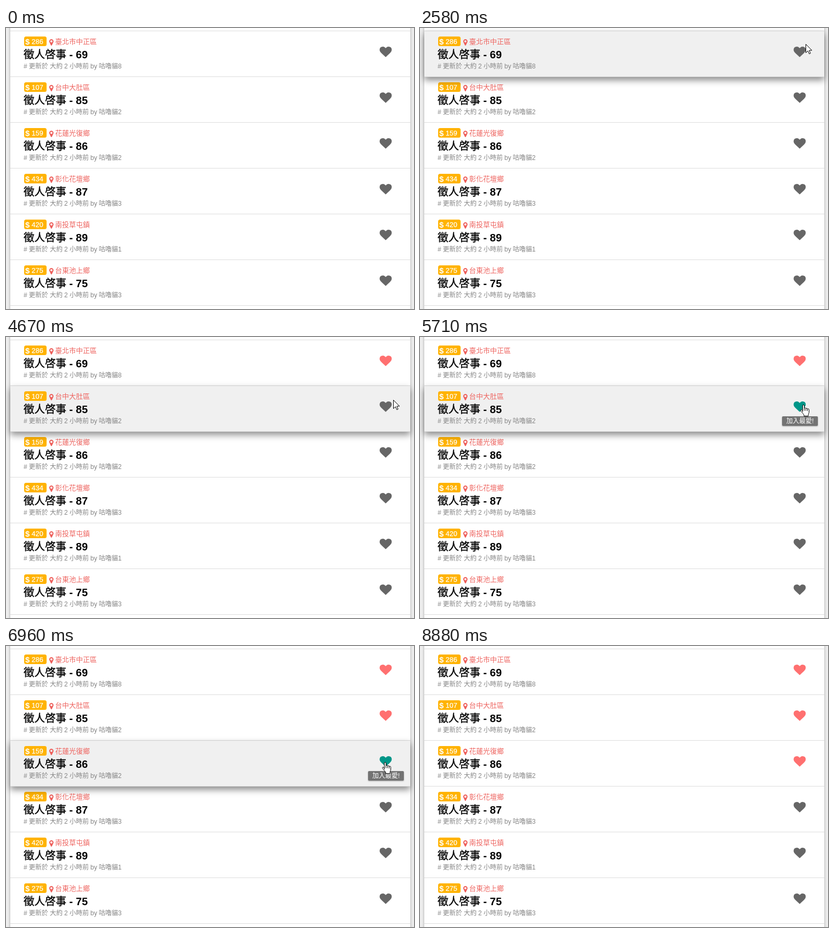
Recreate the animation shown at these times as an HTML page. Size 764 by 528 pixels, loop 8.93 s.

```html
<!DOCTYPE html>
<html lang="zh-Hant">
<head>
<meta charset="utf-8">
<title>Favourites list</title>
<style>
  html, body { margin: 0; width: 100%; height: 100%; overflow: hidden; }
  #stage {
    position: absolute; left: 0; top: 0; width: 764px; height: 528px; overflow: hidden;
    background: #eee;
    font-family: "Liberation Sans", "Noto Sans CJK TC", "Noto Sans CJK", sans-serif;
  }
  #page {
    position: absolute; left: 8px; top: -100px; width: 749px; height: 728px;
    background: #fff; box-shadow: 0 2px 5px rgba(0, 0, 0, .3);
  }
  .row {
    position: absolute; left: 8px; width: 749px; height: 86px;
    box-sizing: border-box; border-bottom: 1px solid #ddd;
  }
  .row svg { position: absolute; left: -8px; top: 0; width: 764px; height: 86px; overflow: visible; }
  text { white-space: pre; }
  .price { font-size: 13px; fill: #fff; stroke: #fff; stroke-width: .25px; }
  .sign { font-size: 15px; font-weight: bold; fill: #fff; }
  .place { font-size: 13px; font-weight: 300; fill: #ee6560; }
  .title { font-size: 20px; font-weight: bold; fill: #000; }
  .han { font-weight: 400; stroke: #000; stroke-width: .35px; }
  .meta { font-size: 12px; font-weight: 300; fill: #858585; word-spacing: -.2px; }
  .tip { filter: drop-shadow(0 1px 1px rgba(0, 0, 0, .3)); }
  .tip text { font-size: 12px; fill: #fff; }
  #cursor { position: absolute; left: 0; top: 0; width: 24px; height: 26px; overflow: visible; z-index: 9; }
  #cursor path { fill: #fff; stroke: #000; stroke-width: 1; stroke-linejoin: round; }
  #cursor .crease { fill: none; }
</style>
</head>
<body>
<div id="stage">
  <div id="page"></div>
  <svg id="cursor">
    <path id="arrow" d="M.5 .5V16.5L4.3 13 6.8 18.6 9.2 17.6 6.8 12H11.8Z"/>
    <g id="hand" transform="translate(-6 0)">
      <path d="M4.5 14V2a1.5 1.5 0 0 1 3 0V7.5a1.5 1.5 0 0 1 3 0V8.5a1.5 1.5 0 0 1 3 0v1a1.5 1.5 0 0 1 3 0V14c0 2-1.5 3.5-1.5 5.5v2H7v-2C6 17 2.5 14.5 1 11.5c-.6-1.5 1-2.5 2-1.5L4.5 12Z"/>
      <path class="crease" d="M7.5 7.5v4M10.5 8.5v3M13.5 9.5v2.5"/>
    </g>
  </svg>
</div>
<script>
const LOOP = 8930, FADE = 300, TOP = 6, ROW = 86;
const GRAY = [102, 102, 102], TEAL = [0, 150, 136], PINK = [255, 112, 112];

const HEART = "M896 1664q-26 0-44-18l-624-602q-10-8-27.5-26T145 952.5 77 855 23.5 734 0 596q0-220 127-344t351-124q62 0 126.5 21.5t120 58T820 276t76 68q36-36 76-68t95.5-68.5 120-58T1314 128q224 0 351 124t127 344q0 221-229 450l-623 600q-18 18-44 18z";
const PIN = "M1152 640q0-106-75-181t-181-75-181 75-75 181 75 181 181 75 181-75 75-181zm256 0q0 109-33 179l-364 774q-16 33-47.5 52t-67.5 19-67.5-19-46.5-52L417 819q-33-70-33-179 0-212 150-362t362-150 362 150 150 362z";

// price, place, number, author suffix, time of the click on the heart
const ITEMS = [
  null,
  [286, "臺北市中正區", 69, 8, 3630],
  [107, "台中大肚區", 85, 2, 5790],
  [159, "花蓮光復鄉", 86, 2, 7880],
  [434, "彰化花壇鄉", 87, 3],
  [420, "南投草屯鎮", 89, 1],
  [275, "台東池上鄉", 75, 3],
  null
];

// pointer path: time, x, y
const PATH = [
  [1960, 747, -12], [2150, 742, 4], [2580, 722, 30], [2830, 712, 42],
  [3630, 712, 42], [4000, 728, 62], [4250, 740, 76], [4400, 743, 94],
  [4540, 736, 108], [4700, 722, 120], [4900, 718, 127],
  [5790, 718, 127], [6150, 748, 158], [6350, 752, 180], [6580, 728, 208],
  [6640, 722, 211], [6920, 710, 218],
  [7880, 710, 218], [8250, 735, 245], [8570, 757, 256], [8880, 765, 247]
];

const $ = id => document.getElementById(id);
const clamp = v => Math.max(0, Math.min(1, v));
const mix = (a, b, k) => a.map((v, i) => v + (b[i] - v) * k);

function pointer(t) {
  const n = PATH.findIndex(p => p[0] > t);
  if (n < 1) return null;
  const [a, b] = [PATH[n - 1], PATH[n]];
  return mix(a, b, (t - a[0]) / (b[0] - a[0])).slice(1);
}

const inRow = (p, i) => p[0] < 757 && Math.floor((p[1] - TOP) / ROW) + 1 === i;
const onHeart = (p, i) => inRow(p, i) &&
  Math.abs(p[0] - 711) < 12 && Math.abs(p[1] - TOP - (i - 1) * ROW - 38) < 13;

// first and last moment at which the pointer passes the test
function span(test, i) {
  let from = Infinity, to = Infinity;
  for (let t = 0; t < LOOP; t += 5) {
    const p = pointer(t);
    if (!p || !test(p, i)) continue;
    if (from === Infinity) from = t;
    to = t + 5;
  }
  return [from, to];
}

const during = (t, [a, b]) => t >= a && t < b;
const fade = (t, [a, b]) => a === Infinity ? 0 : clamp((t - a) / FADE) - clamp((t - b) / FADE);

function content([price, place, number, author]) {
  return `<svg>
    <rect x="34" y="10" width="42" height="18" rx="3.5" fill="#ffb300"/>
    <text class="sign" x="36" y="24.5">$</text>
    <text class="price" x="48" y="24">${price}</text>
    <path d="${PIN}" fill="#ee5f5b" transform="translate(78 14) scale(.0078)"/>
    <text class="place" x="92" y="24">${place}</text>
    <text class="title" x="33" y="50.5"><tspan class="han">徵人啓事</tspan> - ${number}</text>
    <text class="meta" x="33" y="70"># 更新於 大約 2 小時前 by 咕嚕貓${author}</text>
    <path class="heart" d="${HEART}" transform="translate(699.6 27.4) scale(.0127)"/>
    <g class="tip">
      <rect x="678" y="57" width="67" height="18" rx="2" fill="#737373"/>
      <text x="686" y="70">加入最愛!</text>
    </g>
  </svg>`;
}

const rows = ITEMS.map((item, i) => {
  const el = document.createElement("div");
  el.className = "row";
  el.style.top = TOP + (i - 1) * ROW + "px";
  if (item) el.innerHTML = content(item);
  $("stage").insertBefore(el, $("cursor"));
  return {
    el, heart: el.querySelector(".heart"), tip: el.querySelector(".tip"),
    over: span(inRow, i), hot: span(onHeart, i), click: item && item[4] || Infinity
  };
});

function draw(t) {
  for (const r of rows) {
    const lift = fade(t, r.over), active = during(t, r.over);
    r.el.style.background = active ? "#f0f0f0" : "none";
    r.el.style.boxShadow = lift ? `0 6px 12px rgba(0,0,0,${(.46 * lift).toFixed(3)})` : "none";
    r.el.style.zIndex = active ? 2 : lift ? 1 : 0;
    if (!r.heart) continue;
    const glow = fade(t, r.hot), liked = clamp((t - r.click) / 150);
    r.heart.style.fill = `rgb(${mix(mix(GRAY, TEAL, glow), PINK, liked).map(Math.round)})`;
    r.tip.style.opacity = glow;
  }
  const p = pointer(t);
  $("cursor").style.display = p ? "block" : "none";
  if (!p) return;
  const hand = rows.some(r => during(t, r.hot));
  $("hand").style.display = hand ? "inline" : "none";
  $("arrow").style.display = hand ? "none" : "inline";
  $("cursor").style.transform = `translate(${Math.round(p[0])}px, ${Math.round(p[1])}px)`;
}

const start = performance.now();
function tick() {
  draw((performance.now() - start) % LOOP);
  requestAnimationFrame(tick);
}
tick();
</script>
</body>
</html>
```
